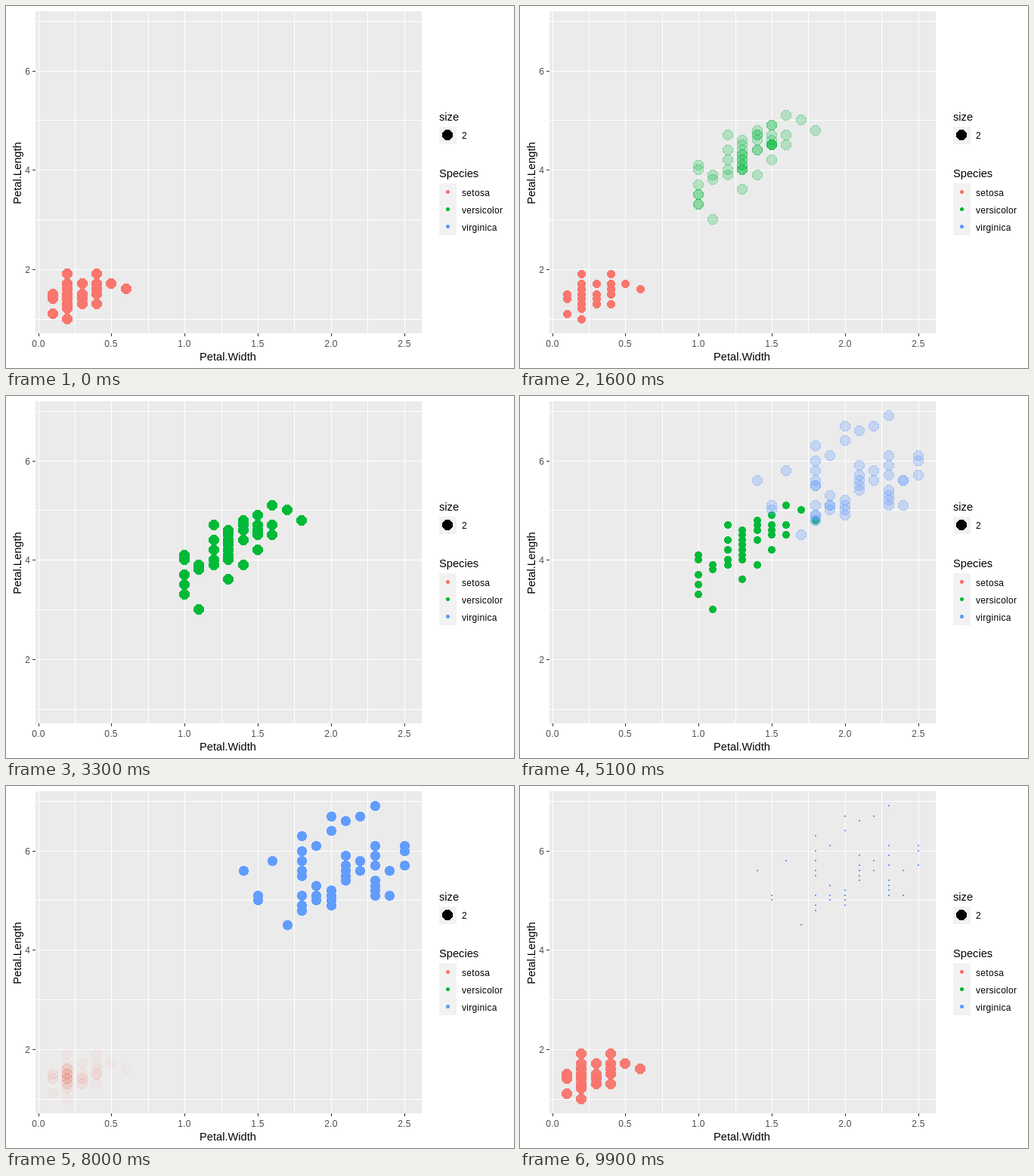
Write an HTML page with a canvas that moves like this. It is 672x480 px and loops after 10 s.

```html
<!DOCTYPE html>
<html lang="en">
<head>
<meta charset="utf-8">
<title>Petal scatter plot</title>
<style>
  html, body { margin: 0; width: 100%; height: 100%; overflow: hidden; background: #fff; }
  canvas { display: block; }
</style>
</head>
<body>
<canvas id="plot" width="672" height="480"></canvas>
<script>
const ctx = document.getElementById('plot').getContext('2d');
const STEP = 100, STEPS = 100;
const FULL = 14;
const FONT = '"Liberation Sans", Arial, sans-serif';

// Petal widths mapped to lengths, both in tenths; [length, n] repeats a point.
const species = [
  { name: 'setosa', color: '#F8766D', petals: {
    1: [11, [14, 2], [15, 2]],
    2: [10, [12, 2], [13, 4], [14, 8], [15, 7], [16, 5], 17, 19],
    3: [[13, 2], [14, 3], 15, 17],
    4: [13, [15, 3], 16, 17, 19],
    5: [17],
    6: [16]
  } },
  { name: 'versicolor', color: '#00BA38', petals: {
    10: [[33, 2], [35, 2], 37, 40, 41],
    11: [30, 38, 39],
    12: [39, 40, 42, 44, 47],
    13: [36, [40, 3], [41, 2], [42, 2], [43, 2], 44, 45, 46],
    14: [39, [44, 2], 46, [47, 2], 48],
    15: [42, [45, 5], 46, 47, [49, 2]],
    16: [45, 47, 51],
    17: [50],
    18: [48]
  } },
  { name: 'virginica', color: '#619CFF', petals: {
    14: [56],
    15: [50, 51],
    16: [58],
    17: [45],
    18: [[48, 2], [49, 2], 51, [55, 2], 56, 58, 60, 63],
    19: [50, [51, 2], 53, 61],
    20: [49, 50, 51, 52, 64, 67],
    21: [54, 55, 56, 57, 59, 66],
    22: [56, 58, 67],
    23: [51, 52, 53, 54, 57, 59, 61, 69],
    24: [51, [56, 2]],
    25: [57, 60, 61]
  } }
];

const transitions = [
  { start: 11, end: 33, from: 0, to: 1 },
  { start: 45, end: 67, from: 1, to: 2 },
  { start: 79, end: 100, from: 2, to: 0 }
];

const px = v => Math.floor(43 + 193.6 * v);
const py = v => Math.floor(480.8 - 65.78 * v);

for (const s of species) {
  s.points = [];
  for (const [width, lengths] of Object.entries(s.petals)) {
    for (const entry of lengths) {
      const [length, n] = [].concat(entry, 1);
      for (let i = 0; i < n; i++) s.points.push([px(width / 10), py(length / 10)]);
    }
  }
}

function rect(color, x, y, w, h) {
  ctx.fillStyle = color;
  ctx.fillRect(x, y, w, h);
}

function text(str, x, y, size, color = '#000', align = 'left', spacing = 0) {
  ctx.font = size + 'px ' + FONT;
  ctx.letterSpacing = spacing + 'px';
  ctx.textAlign = align;
  ctx.fillStyle = color;
  ctx.fillText(str, x, y);
}

// Adds a disc of whole pixels, one span per row.
function addDisc(path, left, top, d) {
  const r = d / 2;
  for (let row = 0; row < d; row++) {
    const dy = row + 0.5 - r;
    const inset = Math.round(r - Math.sqrt(r * r - dy * dy));
    path.rect(left + inset, top + row, d - 2 * inset, 1);
  }
}

const shapes = {};
function shape(d) {
  if (!shapes[d]) {
    const o = -Math.floor(d / 2);
    const fill = new Path2D(), ring = new Path2D();
    addDisc(fill, o, o, d);
    addDisc(ring, o, o, d);
    if (d > 2) addDisc(ring, o + 1, o + 1, d - 2);
    shapes[d] = { fill, ring };
  }
  return shapes[d];
}

function dot(x, y, d, color, alpha = 1) {
  const { fill, ring } = shape(d);
  ctx.save();
  ctx.translate(x, y);
  ctx.globalAlpha = alpha;
  ctx.fillStyle = color;
  ctx.fill(fill);
  if (alpha < 1) ctx.fill(ring, 'evenodd');
  ctx.restore();
}

function drawAxes() {
  rect('#EBEBEB', 39, 7, 511, 427);
  for (let i = 0; i <= 10; i++) rect('#fff', px(i / 4), 7, 1, 427);
  for (let v = 1; v <= 7; v++) rect('#fff', 39, py(v), 511, 1);

  for (let i = 0; i <= 5; i++) {
    const x = px(i / 2);
    rect('#333', x, 434, 1, 4);
    text((i / 2).toFixed(1), x, 452, 12, '#4D4D4D', 'center', 0.3);
  }
  for (const v of [2, 4, 6]) {
    rect('#333', 35, py(v), 4, 1);
    text(v, 32, py(v) + 5, 12, '#4D4D4D', 'right');
  }

  text('Petal.Width', 293.5, 470, 14.67, '#000', 'center');
  ctx.save();
  ctx.translate(20, 221.5);
  ctx.rotate(-Math.PI / 2);
  text('Petal.Length', 0, 0, 14.67, '#000', 'center');
  ctx.restore();
}

function drawLegend() {
  text('size', 573, 152, 14.67);
  rect('#F2F2F2', 573, 160, 23, 23);
  dot(584, 171, FULL, '#000');
  text('2', 603, 176, 12, '#000', 'left', 0.3);

  text('Species', 573, 227, 14.67);
  rect('#F2F2F2', 573, 235, 23, 69);
  species.forEach((s, i) => {
    const y = 247 + 23 * i;
    dot(584, y - 1, 5, s.color);
    text(s.name, 603, y + 5, 12, '#000', 'left', 0.3);
  });
}

function drawSpecies(s, d, alpha) {
  for (const [x, y] of s.points) dot(x, y, d, s.color, alpha);
}

// The leaving group shrinks while the arriving group fades in.
function drawPoints(step) {
  const { start, end, from, to } = transitions.find(tr => step < tr.end);
  const t = Math.max(0, (step - start) / (end - start));
  species.forEach((s, i) => {
    if (i === from) drawSpecies(s, Math.max(2, Math.floor(14.05 - 13.22 * t)), 1);
    else if (i === to && t > 0) drawSpecies(s, FULL, t);
  });
}

const origin = performance.now();
let shown = -1;
function tick() {
  const step = Math.floor((performance.now() - origin) / STEP) % STEPS;
  if (step !== shown) {
    shown = step;
    rect('#fff', 0, 0, 672, 480);
    drawAxes();
    drawLegend();
    drawPoints(step);
  }
  requestAnimationFrame(tick);
}
tick();
</script>
</body>
</html>
```
